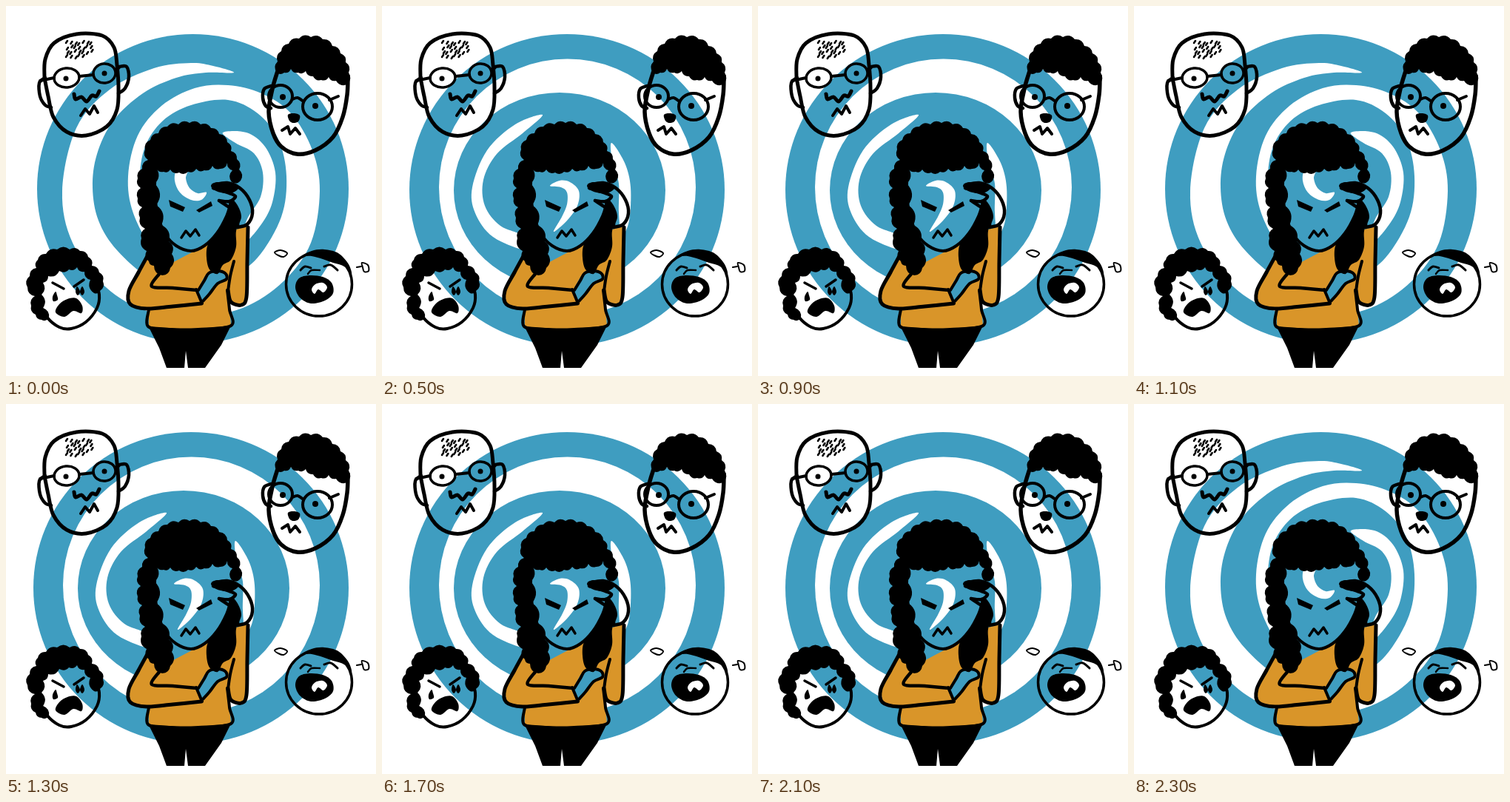
Animation of 500 by 500 pixels, one loop 8 s. Source, as an HTML page with a canvas:

```html
<!DOCTYPE html>
<html>
<head>
<meta charset="utf-8">
<style>
html, body { margin: 0; width: 100%; height: 100%; overflow: hidden; background: #fff; }
canvas { display: block; width: 100vmin; height: 100vmin; }
</style>
</head>
<body>
<canvas id="stage" width="500" height="500"></canvas>
<script>
const ctx = document.getElementById('stage').getContext('2d');
const BLUE = '#3f9dc0', ORANGE = '#d99529', BLACK = '#000', WHITE = '#fff';
ctx.lineCap = ctx.lineJoin = 'round';

const points = s => s.trim().split(/\s+/).map(p => p.split(',').map(Number));

// Smooth curve through the given points
function smooth(s, closed) {
  const p = points(s), n = p.length, path = new Path2D();
  const at = i => closed ? p[(i + n) % n] : p[Math.max(0, Math.min(n - 1, i))];
  path.moveTo(...p[0]);
  for (let i = 0; i < (closed ? n : n - 1); i++) {
    const [a, b, c, d] = [at(i - 1), at(i), at(i + 1), at(i + 2)];
    path.bezierCurveTo(b[0] + (c[0] - a[0]) / 6, b[1] + (c[1] - a[1]) / 6,
      c[0] - (d[0] - b[0]) / 6, c[1] - (d[1] - b[1]) / 6, c[0], c[1]);
  }
  return path;
}

// Outline made of outward bumps
function scallop(s) {
  const p = points(s), path = new Path2D();
  path.moveTo(...p[0]);
  p.forEach((b, i) => {
    const c = p[(i + 1) % p.length], dx = c[0] - b[0], dy = c[1] - b[1];
    path.quadraticCurveTo((b[0] + c[0]) / 2 + dy * .42, (b[1] + c[1]) / 2 - dx * .42, ...c);
  });
  return path;
}

const poly = (s, closed) => new Path2D('M' + s + (closed ? 'Z' : ''));

function fill(path, color = BLACK) {
  ctx.fillStyle = color;
  ctx.fill(path);
}
function line(path, width = 5) {
  ctx.strokeStyle = BLACK;
  ctx.lineWidth = width;
  ctx.stroke(path);
}
function oval(x, y, rx, ry = rx, turn = 0) {
  const path = new Path2D();
  path.ellipse(x, y, rx, ry, turn, 0, 7);
  return path;
}
const blob = (s, color) => fill(smooth(s, true), color);
const stroke = (s, width) => line(smooth(s), width);
const zigzag = (s, width) => line(poly(s), width);

function swirlA() {
  fill(oval(252.5, 247, 210.5, 209), BLUE);
  blob(`308,90 280,81 250,77 200,84 140,113 95,165 76,250 90,320 135,380 190,412 253,420
    320,408 375,372 412,320 424,250 414,195 385,145 345,118 300,107 255,111 210,135 178,175
    165,230 172,280 200,330 212,305 190,275 181,235 188,190 212,155 250,134 300,127 340,145
    368,180 379,230 372,285 340,340 300,368 253,378 195,367 150,330 125,290 117,245 123,200
    145,155 185,118 230,97 270,90`, WHITE);
  blob(`293,171 325,171 350,190 364,225 360,265 345,295 320,322 325,290 344,258 347,225
    335,199 310,185`, WHITE);
  blob('231,221 228,236 235,252 250,262 264,262 271,252 259,253 248,246 243,233 245,222', WHITE);
}

function swirlB() {
  fill(oval(250, 248.5, 213, 210.5), BLUE);
  fill(oval(250.5, 245, 173.5), WHITE);
  fill(oval(240, 249, 143, 132), BLUE);
  blob(`217,147 180,160 142,195 122,245 126,280 150,312 195,330 195,312 160,297 139,270
    137,235 155,200 190,172`, WHITE);
  blob('310,185 328,212 336,245 334,290 324,310 320,280 320,240 312,215', WHITE);
  blob('227,243 240,236 254,238 266,250 264,270 250,290 232,305 243,285 250,268 250,252 242,245', WHITE);
}

function baldMan() {
  stroke('52,97 53,72 65,50 95,38 130,40 146,56 150,80 152,110 150,140 136,163 108,175 82,170 64,150 57,122 52,97', 5);
  stroke('53,97 45,104 46,122 53,134 61,137', 4.5);
  stroke('153,82 163,82 166,96 161,111 152,118', 4.5);
  line(oval(82, 97, 17, 13, -.1), 3.5);
  line(oval(133, 91, 15, 13, -.1), 3.5);
  zigzag('46,101 65,97', 4);
  zigzag('99,95 118,93', 4);
  zigzag('147,86 153,84', 3);
  fill(oval(81, 98, 3.5));
  fill(oval(133, 91, 3.5));
  stroke('92,119 94,126 102,123 109,129 116,121 122,122 126,115', 5);
  zigzag('101,148 107,139 113,146 119,135 124,144', 4);
  for (let i = 0; i < 28; i++) {
    const x = 83 + i % 7 * 5.4 + i * 7 % 3, y = 47 + (i / 7 | 0) * 6 + i * 5 % 4;
    if (i > 20 && i % 7 > 4) continue;
    zigzag(`${x},${y} ${x - 2},${y + 3}`, 2.6);
  }
}

function curlyMan() {
  stroke('367,88 360,112 355,143 361,172 372,190 393,200 418,195 442,177 455,150 461,120 462,95', 5.5);
  fill(scallop(`366,90 367,75 372,61 382,51 396,44 412,42 428,45 441,54 452,64 459,76 463,90 461,106
    446,101 436,96 426,100 415,95 405,88 395,90 385,85 376,90`));
  stroke('358,108 349,112 347,124 351,135 358,138', 4.5);
  line(oval(371, 122, 16, 15), 4);
  line(oval(421, 136, 20, 18), 4);
  stroke('387,126 394,124 402,129', 4);
  zigzag('437,127 449,122', 4);
  fill(oval(374, 123, 4));
  fill(oval(418, 135, 4));
  blob('381,147 389,145 397,148 395,156 388,158 383,155');
  zigzag('373,168 381,163 384,173 391,165 397,173', 4);
}

function shoutingWoman() {
  stroke('48,376 46,400 55,420 72,434 88,436 108,427 123,408 126,390 120,370', 4);
  fill(scallop(`40,417 34,405 39,392 29,380 32,365 41,354 43,343 54,335 69,329 86,329 100,331
    111,339 116,351 126,360 131,372 127,385 119,388 114,370 106,359 96,353 85,356 72,358 57,365
    50,374 48,390 50,408 58,422 48,424`));
  zigzag('63,374 78,382', 3.5);
  zigzag('92,379 105,370', 3.5);
  blob('67,386 63,393 64,399 70,397 69,391');
  blob('96,379 94,386 97,391 100,386');
  blob('103,379 100,386 103,391 106,386');
  blob('67,414 72,403 83,396 95,395 103,405 102,415 91,412 79,420');
}

function cryingBaby() {
  line(oval(423, 376, 44.5, 43), 3.5);
  blob('400,338 413,331 430,329 449,334 463,349 467,363 457,352 442,347 428,342 413,338');
  stroke('398,357 404,352 412,354', 3);
  stroke('430,352 439,350 448,357', 3);
  stroke('408,362 413,357 424,357', 2.5);
  blob('391,380 396,368 410,364 428,366 440,374 442,388 431,398 412,402 397,394');
  blob('413,383 418,376 428,374 434,380 429,387 422,383 417,389', WHITE);
  line(smooth('363,333 371,330 380,334 375,339 368,337', true), 2);
  line(smooth('481,347 489,350 490,358 484,359 482,353', true), 2);
  zigzag('474,353 480,352', 2);
}

function woman() {
  // Trousers
  fill(poly('192,432 305,430 291,458 269,489 246,489 243,466 241,489 217,489 207,462', true));
  // Sweater and arms
  const torso = poly('190,338 215,352 268,324 304,304 325,298 326,345 325,395 318,404 304,402 300,390 304,432 250,437 193,433 193,409 168,403 166,384', true);
  fill(torso, ORANGE);
  stroke('191,338 179,360 166,385 168,403 190,409 225,406 264,402', 5);
  stroke('207,362 197,379 225,381 258,384', 4.5);
  stroke('193,410 192,433 220,437 260,437 304,432 302,410 299,384', 4);
  stroke('327,299 326,345 325,393 318,404 304,400 300,384', 5);
  stroke('308,345 303,365 300,385', 4);
  // Crossed hand
  blob('260,384 271,363 285,357 297,361 298,369 287,376 274,391 265,398', BLUE);
  stroke('260,384 268,371 274,361 285,358 296,361 298,369 286,375 275,389 266,399', 4);
  zigzag('257,383 265,402', 4);
  // Hair framing a see-through face
  fill(scallop(`192,208 188,194 195,181 206,172 218,163 233,160 248,158 263,160 277,165 288,173
    299,184 304,196 312,207 315,221 317,236 305,238 306,222 299,212 289,220 279,216 268,222
    257,220 246,224 234,225 222,221 213,224 203,219 201,240 203,269 210,296 220,318 224,335
    222,354 211,364 200,351 193,345 190,331 183,314 188,301 181,286 184,272 178,260 182,246
    178,233 184,220`));
  blob('303,262 312,268 318,285 311,304 311,325 304,343 293,350 286,362 275,356 271,340 273,322 286,308 297,287');
  stroke('202,222 201,250 205,282 215,308 230,324 250,331 268,324 285,307 298,284 304,265', 4);
  // Raised hand
  stroke('280,242 299,239 316,246 329,262 333,280 326,295 313,299', 4.5);
  stroke('280,246 299,252 310,257 302,264 288,263', 4.5);
  stroke('288,263 300,271 312,280 313,299', 4.5);
  blob('277,243 285,238 303,240 315,244 309,251 297,253 284,250');
  // Features
  fill(poly('220,262 242,272 239,278 222,271', true));
  fill(poly('257,276 277,264 279,270 261,279', true));
  zigzag('237,313 243,304 249,311 256,302 261,310', 3.5);
}

const poses = [swirlA, swirlB];
const start = performance.now();

function draw(now) {
  const t = Math.max(0, now - start) % 8000;
  const pose = t < 500 || t >= 2300 ? 0 : (Math.floor((t - 500) / 200) + 1) % 2;
  ctx.fillStyle = WHITE;
  ctx.fillRect(0, 0, 500, 500);
  poses[pose]();
  [baldMan, curlyMan, shoutingWoman, cryingBaby, woman].forEach(part => part());
  requestAnimationFrame(draw);
}
draw(start);
</script>
</body>
</html>
```
